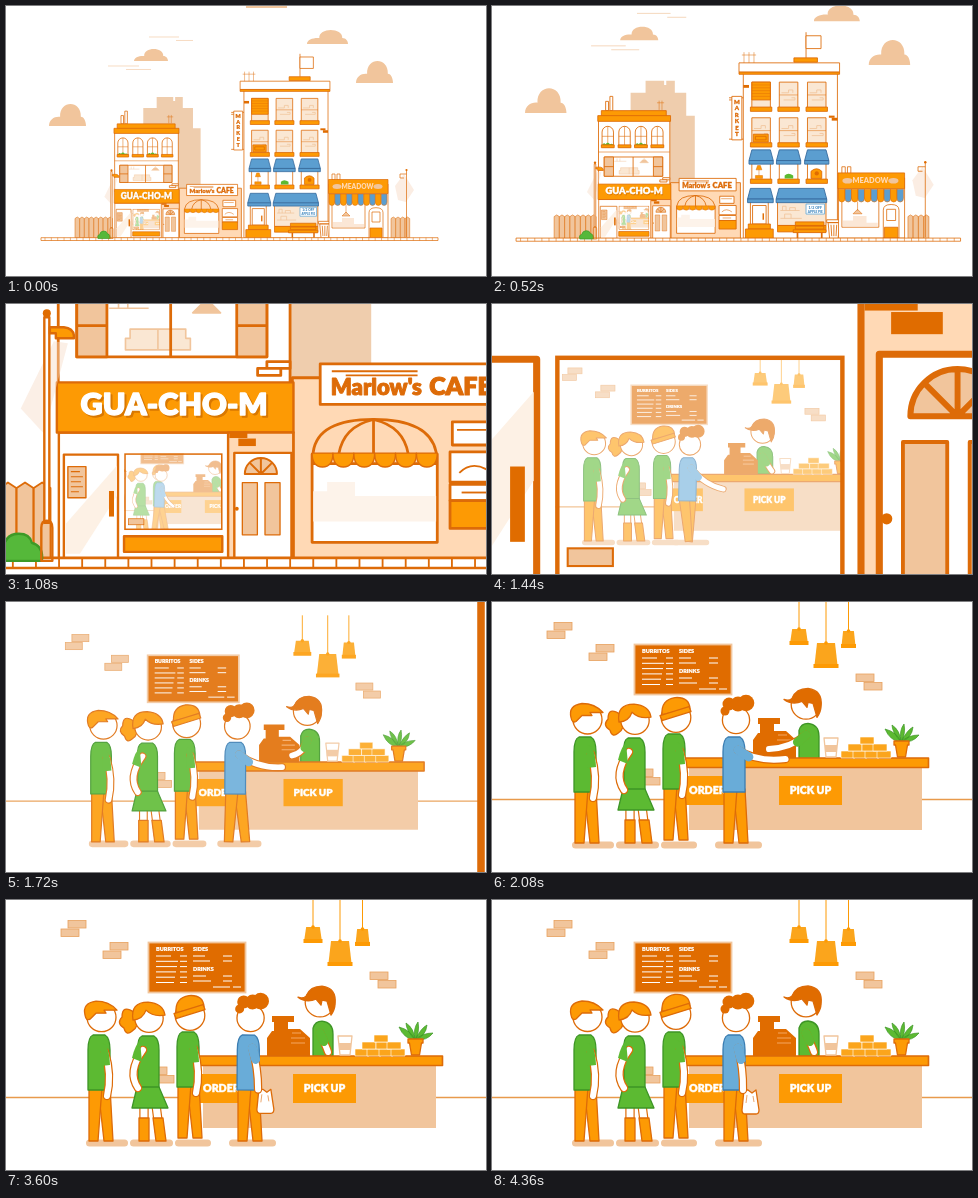
Animation, 480 px wide and 270 px high, one loop 4440 ms. Source, as an HTML page:

```html
<!DOCTYPE html>
<html lang="en">
<head>
<meta charset="utf-8">
<title>Street to counter</title>
<style>
html, body { margin: 0; width: 100%; height: 100%; overflow: hidden; background: #fff; }
svg { display: block; width: 100vw; height: 100vh; }
text { font-family: Lato, "Open Sans", sans-serif; font-weight: 900; }
</style>
</head>
<body>
<svg viewBox="0 0 480 270">
  <clipPath id="glass"><rect id="pane" x="126.8" y="203.1" width="26.6" height="20.8"/></clipPath>
  <g id="street"></g>
  <g clip-path="url(#glass)">
    <g id="room"></g>
    <rect id="veil" width="480" height="270" fill="#fff"/>
  </g>
  <g id="front"></g>
</svg>
<script>
const LINE = '#dd6b08', ORANGE = '#fd9a04', DARK = '#e06c00', BEIGE = '#f1c59c',
      PEACH = '#ffd9b5', TINT = '#fae7d3', GREEN = '#5cba32', BLUE = '#69acd8', AWNING = '#5b9ed0', NAVY = '#34699c';
const NONE = 'stroke="none"';
const $ = id => document.getElementById(id);
const rect = (x, y, w, h, f = '#fff', a = '') =>
  `<rect x="${x}" y="${y}" width="${w}" height="${h}" fill="${f}" ${a}/>`;
const path = (d, f = 'none', a = '') => `<path d="${d}" fill="${f}" ${a}/>`;
const disc = (x, y, r, f = '#fff', a = '') => `<circle cx="${x}" cy="${y}" r="${r}" fill="${f}" ${a}/>`;
const oval = (x, y, rx, ry, f) => `<ellipse cx="${x}" cy="${y}" rx="${rx}" ry="${ry}" fill="${f}" ${NONE}/>`;
const text = (x, y, size, s, f = '#fff', a = '', weight = 0) =>
  `<text x="${x}" y="${y}" font-size="${size}" fill="${f}" stroke="${f}" stroke-width="${size * weight}" ${a}>${s}</text>`;
const fat = (x, y, size, s, f, a) => text(x, y, size, s, f, a, .045);
const group = (a, ...kids) => `<g ${a}>${kids.join('')}</g>`;
const each = (list, fn) => list.map(fn).join('');
const steps = (n, fn) => each([...Array(n).keys()], fn);
const MID = 'text-anchor="middle"';

// Detail levels: coordinates as seen at zoom 1.57 and 3.63
const mid = (...kids) => group('transform="translate(46.2 82.2) scale(.637)" stroke-width="1.2"', ...kids);
const near = (...kids) => group('transform="scale(.2755) translate(341.9 587)" stroke-width="2.4"', ...kids);

const cloud = (x, y, w, h) => path('M0 0C0 -.3 .15 -.45 .3 -.42 .28 -1.2 .88 -1.2 .86 -.42 .95 -.42 1 -.2 1 0z',
  BEIGE, `${NONE} transform="translate(${x} ${y}) scale(${w} ${h})"`);

const clouds = () => cloud(43, 120, 37, 22) + cloud(350, 77, 37, 22) + cloud(128, 55, 34, 12) + cloud(301, 38, 41, 14) +
  rect(240, 0, 41, 2, BEIGE, NONE) +
  path('M102 60h31M120 63.500h25M143 31h30M170 34.500h17', 'none', `stroke="${BEIGE}" stroke-width=".6"`);

const tower = () => mid(path('M143 235V31H164V14H190V20H193V14H205V31H221V63H233V235Z', '#efcdad', NONE));

const fence = (x, n) => steps(n, i =>
  path(`M${x + i * 4.7} 232v-19.500l2.300 -1.500 2.300 1.500v19.500z`, BEIGE, 'stroke-width=".5"'));

const ground = () => rect(35, 231.7, 397, 2.8) +
  path(steps(62, i => `M${39 + i * 6.35} 231.700v2.800`), 'none', 'stroke-width=".5"');

const upstairs = () => mid(
  rect(98, 66, 100, 96),
  rect(108, 43, 4, 13), rect(114, 36, 4, 20),
  path('M183 55v-13M187 55v-13M180 45h10', 'none', 'stroke-width=".7"'),
  rect(102, 56, 91, 8, ORANGE), rect(97, 63, 102, 8, ORANGE),
  each([111, 134.5, 157.5, 180.5], (x, i) =>
    path(`M${x - 8} 107V86a8 8 0 0 1 16 0v21z`) + path(`M${x} 78v27M${x - 8} 92h16`, 'none', 'stroke-width=".8"') +
    (i % 2 ? '' : path(`M${x - 8} 105q2 -5 5 -2 3 -4 6 0 4 -2 5 2z`, GREEN, NONE)) +
    rect(x - 9, 104, 18, 4, ORANGE)),
  path('M98 114h100', 'none', 'stroke-width=".8"'),
  rect(106, 121, 82, 27), rect(106, 121, 13, 27, BEIGE), rect(175, 121, 13, 27, BEIGE),
  path('M106 134.500h13M175 134.500h13'),
  group(`stroke="${BEIGE}" stroke-width=".7"`,
    path('M127 145v-5h2v-4h24v4h2v5zM141 136v9', TINT),
    path('M156 129l4 -4h4l4 4zM162 121v4', BEIGE), path('M120 127h17M124 127v-4M128 127v-4')),
  path('M146.500 121v27'),
  rect(188, 150, 10, 3), rect(184, 153, 10, 3)
);

const storefront = () => near(
  rect(53, 129, 234, 126),
  rect(51, 79, 236, 50, ORANGE),
  fat(170, 114, 30.5, 'GUA-CHO-M', '#d97800', MID), fat(168, 112, 30.5, 'GUA-CHO-M', '#fff', MID),
  rect(58, 151, 54, 104),
  path('M60 220L111 162V192L74 250H60Z', '#fdf1e5', NONE),
  rect(62, 163, 18, 31, BEIGE, 'stroke-width="1.4"'),
  path('M65 168h9M65 173h12M65 178h10M65 183h12M65 188h8', 'none', 'stroke-width="1"'),
  rect(103, 187.3, 5, 25.5, DARK, NONE),
  rect(118, 232.5, 98, 15.5, ORANGE),
  rect(221.8, 129, 65, 126, PEACH),
  rect(223, 129, 18, 5.5, DARK, NONE), rect(232, 135, 17.5, 7.5, DARK, NONE),
  rect(228, 149.3, 57, 106),
  path('M238.500 170.300a16 16 0 0 1 32 0zM254.500 170.300v-16M254.500 170.300l-11 -11M254.500 170.300l11 -11', BEIGE, 'stroke-width="2"'),
  rect(236, 179, 15, 52, BEIGE, 'stroke-width="1.3"'), rect(258.6, 179, 15, 52, BEIGE, 'stroke-width="1.3"'),
  disc(230.5, 205, 1.9, DARK, NONE)
);

const streetLamp = () => near(
  path('M48 38L15 105 38 130 62 40z', '#f7dcc8', `${NONE} opacity=".45"`),
  path('M-8 257q-4 -13 6 -15 3 -12 15 -12 11 0 13 9 12 3 10 18z', '#55b83a', 'stroke="#3d9a27"'),
  rect(38.5, 14, 5, 205), disc(41, 10, 4, DARK, NONE),
  path('M44 24h14q9 1 10 8v3H50v-5h-6z', ORANGE),
  path('M35.500 257v-33q0 -7 5.500 -7t5.500 7v33z')
);

const cafe = () => mid(
  rect(199, 157, 98, 78, PEACH),
  rect(207.5, 190, 54, 38),
  path('M208 219v-13h6v-4h12v6h35v11z', '#fdf3ea', NONE),
  path('M208 189q2 -14 26 -14t27 14v5h-53z', PEACH),
  path('M234 175v17M234 175q-13 3 -15 15M234 175q13 3 15 15'),
  steps(6, i => path(`M${207.5 + i * 9} 189.500h9q0 6 -4.500 6t-4.500 -6z`, ORANGE, 'stroke-width=".6"')),
  rect(211, 151, 80, 17.5),
  path('M216 154.200h37M222 156h31', 'none', 'stroke-width=".8"'),
  fat(215.5, 164.5, 9.5, "Marlow's", LINE), fat(258, 164.5, 10.8, 'CAFE', LINE),
  rect(268, 176, 20, 10), rect(267, 189, 24, 13),
  path('M271 198q6 -6 14 0M270 179.500h15', 'none', 'stroke-width=".8"'),
  rect(267, 203, 24, 7), rect(267, 210, 24, 12, ORANGE), path('M272 206.500h12', 'none', 'stroke-width=".8"')
);

const blueAwning = (x, y, w) => group(`stroke="${NAVY}"`,
  path(`M${x + 4} ${y}h${w - 8}l4 15h${-w}z`, AWNING), rect(x, y + 15, w, 5, AWNING));

const market = () => mid(
  rect(301, 2, 132, 233),
  rect(295, -11, 141, 13), rect(372, -18, 33, 6, ORANGE),
  path('M389 -18v-36'), rect(389, -49, 21, 18),
  path('M302 -11v-15M309 -11v-15M316 -11v-15M299 -22h20', 'none', 'stroke-width=".7"'),
  rect(295, 2, 141, 3, ORANGE),
  each([16, 66], (y, row) => each([313, 351.5, 391], (x, i) =>
    rect(x, y, 26, 36, TINT) +
    (row || i ? path(`M${x + 3} ${y + 15}h10v-4h6v4M${x + 6} ${y + 25}h16v-3h-5`, 'none', `stroke="${BEIGE}"`) : '') +
    path(`M${x} ${y + 18}h26`, 'none', 'stroke-width=".7"') + rect(x - 2, y + 35, 30, 6, ORANGE))),
  rect(313, 16, 26, 25, ORANGE), path(steps(5, i => `M313 ${20 + i * 4}h26`), 'none', 'stroke-width=".6"'),
  rect(315, 89, 21, 11, ORANGE), path('M318 92h15v5h-15z'),
  each([313, 351.5, 391], x => rect(x, 126, 26, 27) + rect(x - 2, 152, 30, 6, ORANGE) + blueAwning(x - 4, 111, 34)),
  path('M318 151v-4h10v4zM323 147v-9M319 139l2 -6h4l2 6z', ORANGE, 'stroke-width=".7"'),
  path('M359 151v-4q5 -5 12 0v4z', GREEN, NONE),
  path('M396 151v-10q8 -7 15 0v10z', ORANGE), disc(404, 144, 3, DARK, NONE),
  rect(311, 182, 25, 36), rect(314, 189, 19, 26), rect(328, 200, 2, 9, DARK, NONE),
  rect(308, 215, 31, 7, ORANGE), rect(304, 222, 39, 13, ORANGE),
  blueAwning(307, 165, 36),
  rect(349, 182, 68, 35, TINT),
  path('M353 196h27M353 207h30M356 196v-6h5v6M366 196v-4h8v4M359 207v-6h9v6', 'none', `stroke="${BEIGE}"`),
  rect(389, 187, 26, 14, '#fff', `stroke="${BLUE}"`),
  text(402, 193.3, 5, '1/2 OFF', '#3f87bf', MID), text(402, 199, 4.4, 'APPLE PIE', '#3f87bf', MID),
  blueAwning(347, 165, 71), rect(349, 217, 68, 9, ORANGE),
  rect(374, 212, 40, 5, ORANGE), rect(374, 218, 40, 4, ORANGE), rect(371, 223, 46, 4, ORANGE),
  path('M377 227v8M411 227v8', 'none', 'stroke-width="2.400"'),
  path('M420 213h16l-2 22h-12zM418 209h20v4h-20z', '#fff'), path('M424 216l1 16M428 216v16M432 216l-1 16'),
  rect(301, 20, 8, 4, DARK, NONE), rect(425, 66, 8, 4, DARK, NONE), rect(421, 63, 8, 3, DARK, NONE),
  path('M281 41h5M281 96h20M281 38h20'),
  rect(285, 36, 14, 61),
  each([...'MARKET'], (c, i) => fat(292, 46.5 + i * 9.1, 8.5, c, LINE, MID))
);

const corner = () => group('stroke-width=".7"',
  rect(326, 168, 3, 6), rect(331, 168, 3, 6),
  rect(323, 178, 59, 53.7), rect(322.5, 173.5, 59.5, 14, ORANGE),
  each([331, 372], x => oval(x, 180.5, 4.5, 2.5, BEIGE)),
  text(351.5, 182.8, 6.6, 'MEADOW', PEACH, MID),
  rect(326, 196, 33, 26), path('M340 199v8M336 210l4 -4 4 4z', BEIGE, 'stroke-width=".5"'),
  path('M327 221v-5h9v-4h12v6h10v3z', '#fbe7d6', NONE),
  path('M363 231.700v-25q0 -5 7 -5t7 5v25z'), rect(366, 206, 8, 10), rect(364, 222, 12, 9.500, ORANGE),
  steps(10, i => path(`M${323 + i * 5.8} 188h5.800v8q0 3.500 -2.900 3.500t-2.900 -3.500z`,
    i % 2 ? AWNING : ORANGE, 'stroke-width=".5"')),
  path('M389 180l9 -12 10 16 -8 12 -8 -2z', '#f7dcc8', `${NONE} opacity=".5"`),
  path('M400.500 231v-67M394 168h6.500M394 168v4h4'), disc(400.5, 164, 1.1, DARK, NONE)
);

$('street').innerHTML = group(`stroke="${LINE}" stroke-width=".7" stroke-linejoin="round"`,
  clouds(), tower(), fence(69, 8), fence(385, 4), cafe(), market(), corner(), upstairs(), storefront(), ground(), streetLamp());
$('front').innerHTML = group(`stroke="${LINE}"`, near(
  rect(119, 150.5, 96.5, 75, 'none', 'stroke-width="1.500"'),
  rect(122.5, 215, 15.300, 6, BEIGE, 'stroke-width=".7"')));

const bricks = (x, y, dx) => group('stroke="#e8a15e" stroke-width=".8"',
  rect(x, y, 18, 7.5, BEIGE), rect(x + dx, y + 8.500, 18, 7.5, BEIGE));

const board = () => rect(142.5, 42.5, 97, 50, DARK, `stroke="${BEIGE}" stroke-width="1.800"`) +
  fat(150, 51, 5.5, 'BURRITOS') + fat(187, 51, 5.5, 'SIDES') + fat(187, 71, 5.5, 'DRINKS') +
  path(steps(6, i => `M150 ${56 + i * 5.3}h${15 + i * 7 % 8}M174 ${56 + i * 5.3}h7`) +
    each([56, 61, 76, 81], (y, i) => `M187 ${y}h${12 + i * 5 % 9}M217 ${y}h9`) + 'M207 87h17M227 87h8',
    'none', 'stroke="#fff" stroke-width="1"');

const pendant = (x, y, w, h) => path(`M${x} 0V${y}`, 'none', `stroke="${ORANGE}" stroke-width="1"`) +
  path(`M${x - w * .36} ${y}h${w * .72}l${w * .1} ${h - 3}h${-w * .92}z`, '#fba51c', NONE) +
  rect(x - w / 2, y + h - 4, w, 4, ORANGE, NONE) + disc(x, y, 1.800, ORANGE, NONE);

const limb = (d, w = 6, id = '') => group(`${id && `id="${id}"`} fill="none" stroke-linecap="round"`,
  path(d, 'none', `stroke-width="${w + 2.4}"`), path(d, 'none', `stroke="#fff" stroke-width="${w}"`));

const LEGS = ['M92 187H104L107 241H98Z', 'M83 187H96L92 241H83Z'];
const shadow = (x, w) => rect(x, 239.5, w, 7, BEIGE, `rx="3.500" ${NONE}`);
const legs = () => each(LEGS, d => group('class="leg"', path(d, ORANGE)));
const shirt = c => path('M87 135H99Q104 138 104 150V190H82V150Q82 137 87 135Z', c,
  c === BLUE ? 'stroke="#3a7db2"' : 'stroke="#3d9526"');
const sleeve = c => path('M95 143q8 0 9 22l-9 1z', c, NONE);
const restArm = (c = GREEN) => limb('M99 152Q106 175 101 196') + sleeve(c);
const MANHAIR = 'M79 115Q76 103 90 101 103 101 111 110L98 110 100 113 90 113 84 119Q80 121 79 115Z';

const guest = () => shadow(80, 42) + legs() + shirt(GREEN) + restArm() +
  group('class="head"', disc(95.5, 117, 14.5), path(MANHAIR, ORANGE));

const girl = () => shadow(124, 43) +
  limb('M138 205V236', 7) + limb('M150 205L154 236', 7) +
  path('M133 218h10v23h-10zM147 218h10l3 23h-10z', ORANGE) +
  path('M136 136H148Q153 139 153 150V190H132V150Q131 138 136 136Z', GREEN, 'stroke="#3d9526"') +
  path('M131 187H153L162 208H126Z', GREEN, 'stroke="#3d9526"') +
  limb('M137 150Q121 172 132 188') + path('M134 141q-5 4 -8 17l10 4z', GREEN, NONE) +
  group('class="head"', path('M128 112q-12 -8 -12 5 -6 6 2 11 2 8 8 3 8 -5 4 -16z', ORANGE),
    disc(143, 118, 14.2), path('M127 120q-3 -18 15 -18 15 1 17 13 -12 2 -19 -5 -3 9 -13 10Z', ORANGE));

const beanie = () => shadow(169, 36) + group('transform="translate(89 -3)"', legs(), shirt(GREEN), restArm()) +
  group('id="nod"', disc(184, 115, 14.8),
    path('M170 112q-1 -15 13 -17 14 -1 15 11z', ORANGE), path('M168 113l29 -9 2 5 -29 9z', ORANGE));

const cashier = () => group('id="cashier"',
  path('M307 156V128q2 -7 9 -7 11 1 11 13v22z', GREEN, 'stroke="#3d9526"'),
  disc(314, 102, 14.8),
  path('M292 97q5 2 8 -1 4 -10 16 -10 15 2 13 18 0 5 -4 11l-4 -14 -5 -1 -1 5 -5 -6q-10 4 -18 -2Z', DARK));

const till = () => path('M268 122v9h-2l-5 7v19h43v-19l-10 -9h-12v-7h6v-6h-22v6z', DARK, NONE) +
  path('M286 133h9M285 138h14M285 143h14', 'none', 'stroke="#f4a660" stroke-width="1.200"');

const counter = () => rect(197, 164, 233, 64, BEIGE, NONE) +
  rect(192.5, 156, 244, 9.5, ORANGE, 'stroke-width="1.600"') +
  rect(193, 174, 41, 29, ORANGE, NONE) + rect(287, 174, 63, 29, ORANGE, NONE) +
  fat(197, 192, 10.6, 'ORDER') + fat(318.5, 192, 10.6, 'PICK UP', '#fff', MID);

const goods = () => path('M332 136h14l-2 19h-10z', '#fff', `stroke="${BEIGE}"`) + rect(333, 143, 12, 7, BEIGE, NONE) +
  group(`stroke="#fff" stroke-width=".6"`, each([[349, 149], [361, 149], [373, 149], [385, 149], [356, 142], [370, 142], [381, 142], [368, 135]],
    ([x, y]) => rect(x, y, 14, 7, '#fba51c'))) +
  path('M409 140Q398 139 393 127 405 130 409 140ZQ400 130 400 123 408 128 409 140ZQ407 128 412 122 414 132 409 140Z' +
    'Q415 128 421 125 420 136 409 140ZQ416 133 427 133 421 141 409 140Z', GREEN, 'stroke="#3d9526" stroke-width=".7"') +
  path('M402 139h15v4h-1.500l-2 12h-8l-2 -12H402z', ORANGE);

const curls = () => group(NONE, each([[84, 109, 4.5], [88, 102, 6.5], [97, 102, 7.5], [105, 101, 8.3]],
  ([x, y, r]) => disc(x, y, r, DARK)));

const customer = () => group('id="buyer"', shadow(223, 47),
  group('id="stride" transform="translate(149 0)"', legs()),
  group('id="torso"', group('transform="translate(149 0)"', shirt(BLUE), disc(95, 118, 13.6), curls())));

$('room').innerHTML = rect(-900, -900, 2400, 2400) + path('M-300 197.500H197M430 197.500H900', 'none', 'stroke="#e89a4c" stroke-width="1.400"') +
  bricks(62, 20.5, -7) + bricks(104, 42.5, -7) + bricks(364, 72, 8) + bricks(143, 167, 7) + board() +
  pendant(307, 27, 19, 16) + pendant(334, 41, 25, 25) + pendant(356.5, 29, 15, 17) +
  group(`stroke="${LINE}" stroke-width="1.300" stroke-linejoin="round"`,
    cashier(), till(), limb('', 6, 'serve'), path('', 'none', `id="serveSleeve" stroke="${GREEN}" stroke-width="9" stroke-linecap="round"`),
    counter(), goods(), guest(), girl(), beanie(), customer(),
    group('id="bag"', path('M-6 0L-8 20q0 4 3 4H6q3 0 3 -4L6 0 2 3 -2 0z', '#fff'), path('M-3 5l-1 8M3 6l1 6', 'none', 'stroke-width=".6"')),
    limb('', 6, 'reach'), path('', 'none', `id="reachSleeve" stroke="${BLUE}" stroke-width="9" stroke-linecap="round"`));

// Smooth monotone curve through [time, value] pairs
function track(...keys) {
  const slope = keys.slice(1).map((k, i) => (k[1] - keys[i][1]) / (k[0] - keys[i][0]));
  const tangent = keys.map((_, i) => {
    const a = slope[i - 1] || 0, b = slope[i] || 0;
    return a * b > 0 ? 2 * a * b / (a + b) : 0;
  });
  return t => {
    if (t <= keys[0][0]) return keys[0][1];
    const i = keys.findIndex(k => k[0] > t) - 1;
    if (i < 0) return keys[keys.length - 1][1];
    const [t0, a] = keys[i], [t1, b] = keys[i + 1], d = t1 - t0, u = (t - t0) / d, v = 1 - u;
    return v * v * (1 + 2 * u) * a + u * u * (3 - 2 * u) * b + d * u * v * (v * tangent[i] - u * tangent[i + 1]);
  };
}

const LOOP = 4440;
const zoom = track([0, 0], [300, .015], [560, .141], [760, .451], [1080, 1.289], [1440, 2.37], [1800, 3], [2100, 3.2]);
const roomZoom = track([760, -1.652], [1080, -.814], [1440, -.243], [1950, 0]);
const roomX = track([760, 146.1], [1080, 164.6], [1440, 192], [1950, 210]);
const roomY = track([760, 205.1], [1080, 185.5], [1440, 165.6], [1950, 150]);
const haze = track([1080, .56], [1440, .42], [1900, 0]);
const walk = track([800, -66], [1080, -58], [1440, -28], [1900, 0]);
const lean = track([1080, 2], [1900, 0], [2200, 0], [3000, 5], [3500, .8], [3850, 0]);
const handX = track([1080, 216], [1440, 260], [1900, 293], [2400, 294], [2700, 289], [3000, 272], [3500, 253], [3850, 251]);
const handY = track([1080, 188], [1440, 175], [1900, 157], [2400, 157], [2700, 163], [3000, 180], [3500, 189], [3850, 190]);
const serveX = track([1440, 322], [1950, 277], [2250, 277], [2450, 298], [2750, 322]);
const serveY = track([1440, 152], [1950, 147], [2250, 147], [2450, 148], [2750, 152]);
const clerkX = track([1440, -4], [1950, 0]);
const calm = track([3300, 1], [3850, 0]);
const bagX = track([3000, 3], [3700, 7]);
const bagY = track([2450, -22], [2700, -10], [3000, -4], [3700, 0]);

const move = (id, x, y = 0, s = 1) => $(id).setAttribute('transform', `translate(${x} ${y}) scale(${s})`);
const heads = document.querySelectorAll('.head');
const strides = $('stride').querySelectorAll('.leg');

function drawArm(id, x, y, hx, hy, sag) {
  const cx = (x + hx) / 2 + (hx - x > 20 ? -4 : 3), cy = (y + hy) / 2 + sag;
  for (const p of $(id).children) p.setAttribute('d', `M${x} ${y}Q${cx} ${cy} ${hx} ${hy}`);
  $(id + 'Sleeve').setAttribute('d', `M${x} ${y}L${x + (cx - x) * .55} ${y + (cy - y) * .55}`);
}

function camera(t) {
  const z = zoom(t), s = Math.exp(z);
  const fx = 127.4 + (z - .451) * 3.08, fy = 227 - (z - .451) * 4.4;
  const tx = fx * (1 - s), ty = fy * (1 - s);
  for (const id of ['street', 'front', 'pane']) move(id, tx, ty, s);
  const outside = t < 2000 ? 'inline' : 'none';
  for (const id of ['street', 'front']) $(id).style.display = outside;
  const attached = t < 1080;
  const k = attached ? s * .122 : Math.exp(roomZoom(t));
  const px = attached ? 139.3 * s + tx : roomX(t), py = attached ? 212.8 * s + ty : roomY(t);
  move('room', px - 210 * k, py - 150 * k, k);
  $('veil').setAttribute('opacity', haze(t));
}

function people(t) {
  const sway = Math.sin(t / 260);
  heads.forEach((h, i) => h.setAttribute('transform', `translate(0 ${.5 * calm(t) * Math.sin(t / 260 + i)})`));
  move('nod', 0, .6 * sway);
  move('cashier', clerkX(t), .4 * calm(t) * sway);

  const off = walk(t), tilt = lean(t), hx = handX(t), hy = handY(t);
  const swing = t < 1900 ? 9 * Math.sin((off + 66) / 9) * Math.min(1, -off / 12) : 0;
  move('buyer', off);
  $('torso').setAttribute('transform', `rotate(${tilt} 244 190)`);
  strides.forEach((l, i) => l.setAttribute('transform', `rotate(${i ? swing : -swing} 94 188)`));
  drawArm('reach', 246 + off + tilt * .8, 148, hx, hy, hx - off > 262 ? 8 : 0);
  drawArm('serve', 314 + clerkX(t), 133, serveX(t), serveY(t), 6);
  $('bag').style.display = t > 2450 ? 'inline' : 'none';
  move('bag', hx + bagX(t), hy + bagY(t));
}

function frame() {
  const t = performance.now() % LOOP;
  camera(t);
  people(t);
  requestAnimationFrame(frame);
}
frame();
</script>
</body>
</html>
```
